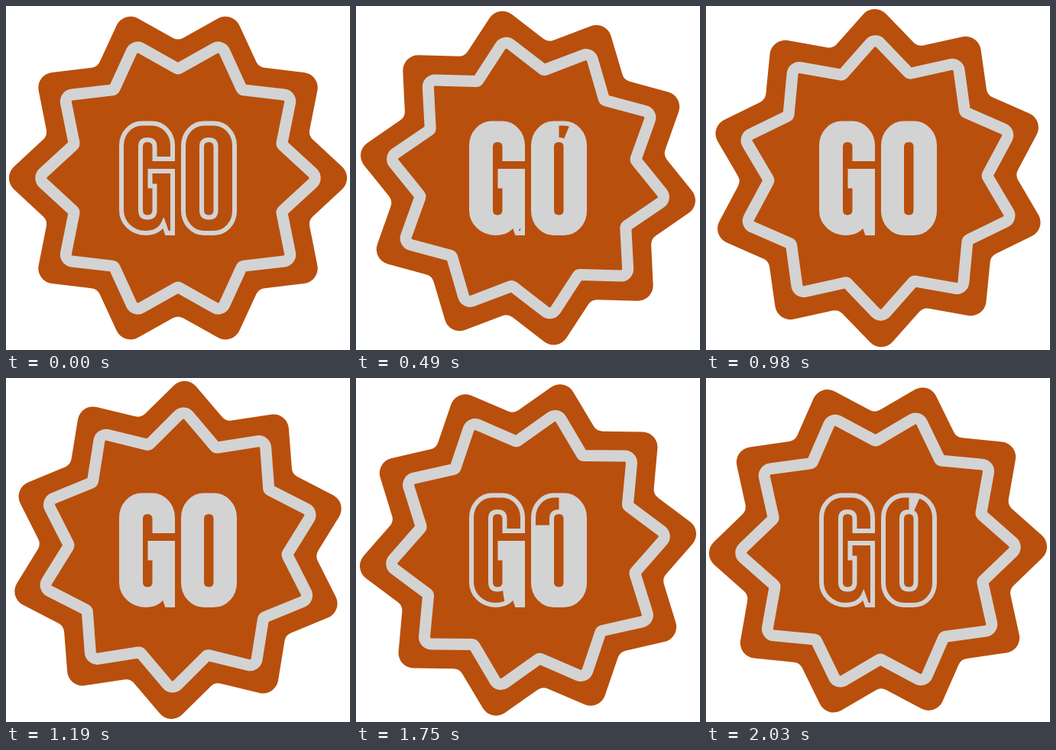
An HTML page that plays this animation: 450x450 px, repeating every 2100 ms.

```html
<!DOCTYPE html>
<html lang="en">
<head>
<meta charset="utf-8">
<title>Go badge</title>
<style>
  html, body { margin: 0; width: 100%; height: 100%; overflow: hidden; background: #fff; }
  svg { display: block; width: 100vw; height: 100vh; }
  .line { fill: none; stroke: #d3d3d3; }
</style>
</head>
<body>
<svg viewBox="0 0 450 450" role="img" aria-label="GO">
  <clipPath id="inside"><use href="#letters" clip-rule="evenodd"/></clipPath>
  <g id="badge">
    <path id="body" fill="#b94f0c"/>
    <path id="ring" class="line" stroke-width="15"/>
  </g>
  <g clip-path="url(#inside)">
    <path id="bowl" class="line" stroke-width="36" pathLength="1"
      d="M206 206V185Q206 164 185 164Q164 164 164 185V265Q164 287 185 287Q200 287 204 272"/>
    <path id="stem" class="line" stroke-width="30" pathLength="1"
      d="M186 226H207V272Q207 290 215 302"/>
    <path id="loop" class="line" stroke-width="38" pathLength="1"
      d="M265.5 163Q244 163 244 186V263Q244 287 265.5 287Q287 287 287 263V186Q287 163 265.5 163"/>
  </g>
  <path id="letters" class="line" stroke-width="6" clip-rule="evenodd"
    d="M218 200H194.5V184Q194.500 175 185 175Q176 175 176 184V267Q176 276.500 185 276.500Q194.500 276.500 194.500 267V235.500H188.500V216H218V297H210.500L206 284Q200 297 182 297A31 30 0 0 1 151 267V182.500A27 29 0 0 1 178 153.500H191A27 29 0 0 1 218 182.500Z
       M232 182.500A27 29 0 0 1 259 153.500H272A27 29 0 0 1 299 182.500V268A27 29 0 0 1 272 297H259A27 29 0 0 1 232 268Z
       M256 184Q256 175 265.500 175Q274.500 175 274.500 184V267Q274.500 276.500 265.500 276.500Q256 276.500 256 267Z"/>
</svg>
<script>
const LOOP = 2100, STEP = 70, POINTS = 10;
const $ = id => document.getElementById(id);

// Star with rounded tips and notches
function star(outer, inner, tipRadius, notchRadius) {
  const n = POINTS * 2;
  const vertex = i => {
    const a = i * Math.PI / POINTS, r = i % 2 ? inner : outer;
    return [225 + r * Math.cos(a), 225 + r * Math.sin(a)];
  };
  let d = '';
  for (let i = 0; i < n; i++) {
    const [x, y] = vertex(i), radius = i % 2 ? notchRadius : tipRadius;
    const [u, v] = [vertex(i + n - 1), vertex(i + 1)].map(([px, py]) => {
      const len = Math.hypot(px - x, py - y);
      return [(px - x) / len, (py - y) / len];
    });
    const half = Math.acos(u[0] * v[0] + u[1] * v[1]) / 2;
    const cut = radius / Math.tan(half);
    const at = w => `${x + w[0] * cut} ${y + w[1] * cut}`;
    d += `${i ? 'L' : 'M'}${at(u)}A${radius} ${radius} 0 0 ${i % 2 ? 0 : 1} ${at(v)}`;
  }
  return d + 'Z';
}

// Slow start, smooth end
function ease(t, start, end) {
  const p = Math.min(1, Math.max(0, (t - start) / (end - start))) ** 2;
  return p * p * (3 - 2 * p);
}

// Each stroke: fill start and end, erase start and end
const strokes = {
  bowl: [0, 350, 1470, 1745],
  stem: [290, 520, 1720, 2030],
  loop: [0, 520, 1450, 2066]
};

function draw() {
  const t = Math.floor(performance.now() % LOOP / STEP) * STEP;
  $('badge').setAttribute('transform', `rotate(${t / LOOP * 360 / POINTS} 225 225)`);
  for (const [id, [a, b, c, d]] of Object.entries(strokes)) {
    const head = ease(t, a, b);
    // A hairline gap opens in the loop as soon as erasing begins
    const tail = Math.max(ease(t, c, d), id === 'loop' && t > c ? 0.004 : 0);
    const shown = head - tail;
    $(id).style.display = shown > 0.001 ? '' : 'none';
    $(id).setAttribute('stroke-dasharray', `0 ${tail} ${shown} 2`);
  }
  requestAnimationFrame(draw);
}

$('body').setAttribute('d', star(230.5, 179.5, 20, 14));
$('ring').setAttribute('d', star(183.5, 142.6, 9, 4));
draw();
</script>
</body>
</html>
```
